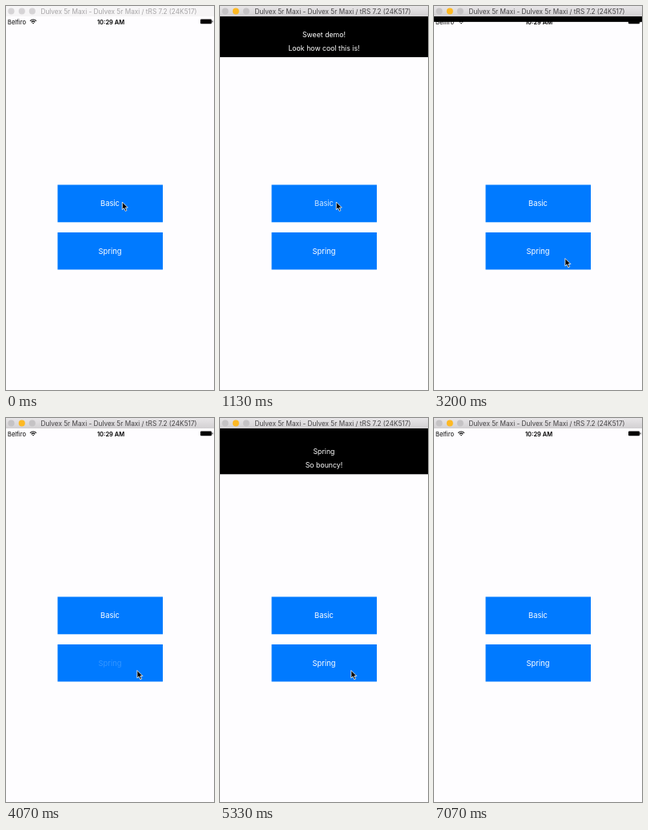
Recreate the animation shown at these times as an HTML page. Size 260x480 px, loop 7790 ms.

```html
<!DOCTYPE html>
<html lang="en">
<head>
<meta charset="utf-8">
<title>Banner demo</title>
<style>
  html, body { margin: 0; width: 100%; height: 100%; overflow: hidden; background: #fefdff; }
  svg { display: block; width: 260px; height: 480px; font-family: Inter, Roboto, sans-serif; }
  .mid { text-anchor: middle; }
  .button { fill: #007aff; }
  .label { fill: #fff; font-size: 9.4px; }
  .toast { fill: #fff; font-size: 8.75px; }
  .status { font-size: 7.5px; }
  .title { font-size: 8.25px; }
</style>
</head>
<body>
<svg viewBox="0 0 260 480">
  <defs>
    <linearGradient id="chrome" x2="0" y2="1">
      <stop stop-color="#e8e6e8"/>
      <stop offset="1" stop-color="#d2d0d2"/>
    </linearGradient>
    <clipPath id="screen"><rect y="13" width="260" height="467"/></clipPath>
  </defs>
  <rect width="260" height="480" fill="#fefdff"/>

  <g class="status">
    <text x="2" y="22.5">Belfiro</text>
    <g fill="none" stroke="#000" stroke-width="1.2">
      <path d="M30.1 18.6a5.6 5.6 0 0 1 7.8 0M31.7 20.3a3.3 3.3 0 0 1 4.6 0"/>
    </g>
    <path d="M32.9 21.4a1.6 1.6 0 0 1 2.2 0L34 22.6z"/>
    <text class="mid" x="131" y="22.5" font-weight="600">10:29 AM</text>
    <rect x="243" y="16.5" width="14" height="5.8" rx="1"/>
    <rect x="257.5" y="18.4" width="1" height="2"/>
  </g>

  <rect class="button" x="64.5" y="223.5" width="131.5" height="46.8"/>
  <rect class="button" x="64.5" y="283" width="131.5" height="46.5"/>
  <text id="basic" class="label mid" x="130" y="250.4">Basic</text>
  <text id="spring" class="label mid" x="130" y="309.9">Spring</text>

  <g clip-path="url(#screen)">
    <g id="banner">
      <rect y="-60" width="260" height="130.3"/>
      <text id="head" class="toast mid" x="130" y="45.2"></text>
      <text id="body" class="toast mid" x="130" y="62.2"></text>
    </g>
  </g>

  <rect id="bar" width="260" height="13"/>
  <circle class="light" cx="6.5" cy="6.5" r="4"/>
  <circle class="light" cx="19.8" cy="6.5" r="4"/>
  <circle class="light" cx="32.8" cy="6.5" r="4"/>
  <text id="title" class="title mid" x="141" y="9.6">Dulvex 5r Maxi - Dulvex 5r Maxi / tRS 7.2 (24K517)</text>

  <path id="cursor" d="M0 0V9.6L2.2 7.6 3.9 11.4 5.6 10.6 4 7H7z" stroke="#fff" stroke-width=".8" stroke-linejoin="round"/>
</svg>
<script>
const LOOP = 7790, STEP = 1000 / 15, HEIGHT = 57.5;
const $ = id => document.getElementById(id);
const lights = document.querySelectorAll('.light');

const shows = [
  { start: 800, hide: 2950, head: 'Sweet demo!', body: 'Look how cool this is!', curve: critical },
  { start: 4110, hide: 6280, head: 'Spring', body: 'So bouncy!', curve: bouncy }
];

const clamp = x => Math.min(1, Math.max(0, x));
const smooth = x => (x = clamp(x), x * x * (3 - 2 * x));
const ramp = (t, from, to) => smooth((t - from) / (to - from));
const mix = (a, b, k) => a + (b - a) * k;

// Spring responses, s in seconds
function critical(s) {
  return 1 - (1 + 10 * s) * Math.exp(-11 * s);
}
function bouncy(s) {
  const decay = 6.9, freq = 15.8;
  return 1 - Math.exp(-decay * s) * (Math.cos(freq * s) + 0.31 * Math.sin(freq * s));
}

// Label opacity: fades to 0.2 on press and back on release
function highlight(t, press, release) {
  return 1 - 0.8 * (ramp(t, press, press + 470) - ramp(t, release, release + 470));
}

function drawBanner(t) {
  const show = shows.find(s => t >= s.start && t < s.hide + 330);
  $('banner').style.display = show ? '' : 'none';
  if (!show) return;
  const shown = show.curve((t - show.start) / 1000) * (1 - ramp(t, show.hide, show.hide + 320));
  $('head').textContent = show.head;
  $('body').textContent = show.body;
  $('banner').setAttribute('transform', `translate(0 ${(shown - 1) * HEIGHT})`);
}

function drawChrome(active) {
  $('bar').setAttribute('fill', active ? 'url(#chrome)' : '#f6f5f6');
  $('title').setAttribute('fill', active ? '#454345' : '#a6a4a6');
  lights.forEach((light, i) => {
    light.setAttribute('fill', active && i === 1 ? '#fdb924' : active ? '#c5c3c5' : '#d6d4d6');
  });
}

function drawCursor(t) {
  const move = ramp(t, 2210, 2530), leave = ramp(t, 6640, 7060);
  const x = mix(mix(145.3, 163.9, move), 264, leave);
  const y = mix(mix(245, 315.5, move), 404, leave);
  $('cursor').setAttribute('transform', `translate(${x} ${y})`);
}

function frame(now) {
  const t = Math.floor((now % LOOP + 5) / STEP) * STEP;
  drawChrome(t >= 730);
  $('basic').setAttribute('opacity', highlight(t, 690, 810));
  $('spring').setAttribute('opacity', highlight(t, 3560, 4080));
  drawBanner(t);
  drawCursor(t);
}

const begin = performance.now();
function tick() {
  frame(performance.now() - begin);
  requestAnimationFrame(tick);
}
tick();
</script>
</body>
</html>
```
